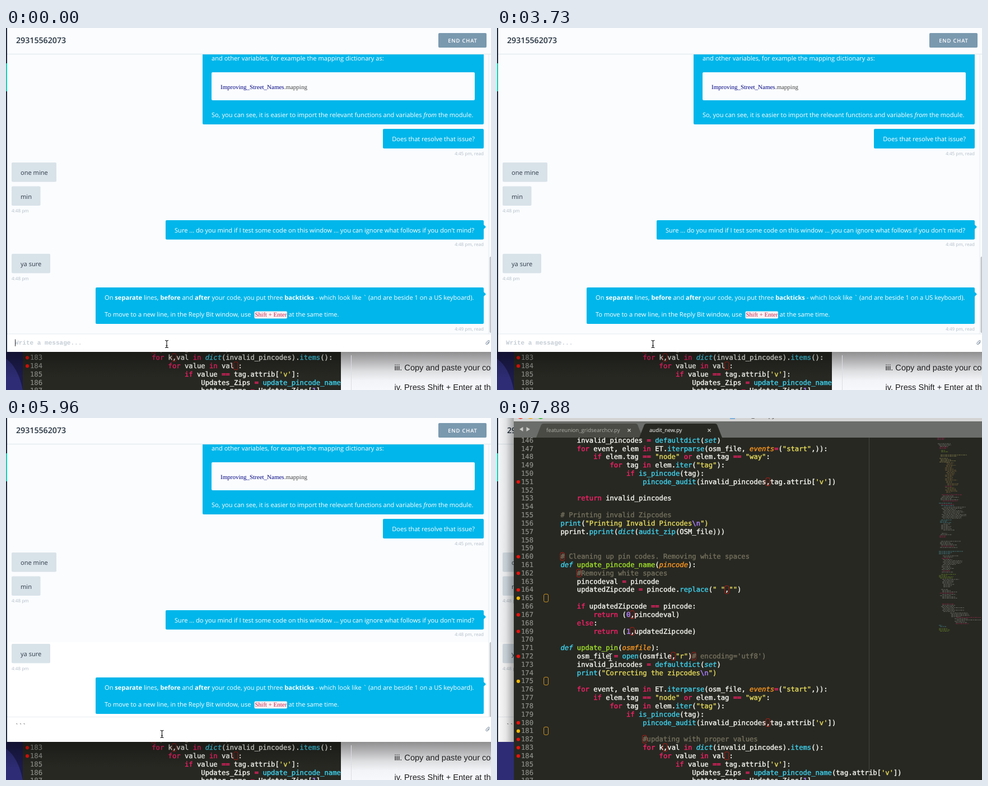
Animation of 866 by 646 pixels, one loop 8000 ms. Source, as an HTML page:

```html
<!DOCTYPE html>
<html lang="en">
<head>
<meta charset="utf-8">
<title>Chat and editor</title>
<style>
html, body { margin: 0; width: 100%; height: 100%; overflow: hidden; background: #fafcfe; }
svg { display: block; width: 866px; height: 646px; }
text { white-space: pre; text-rendering: geometricPrecision; font: 11.1px "Open Sans", sans-serif; fill: #2e3b48; }
.w { fill: #fff; }
.b { font-weight: 700; }
.i { font-style: italic; }
.id { font-size: 14.2px; font-weight: 600; fill: #25323f; }
.btn { font-size: 9.4px; font-weight: 600; letter-spacing: .85px; fill: #fff; }
.time { font-size: 8.1px; fill: #b3bec8; }
.serif { font: 11px "Liberation Serif", serif; }
.hint { font: bold 11.05px "Liberation Mono", monospace; fill: #c4cdd5; }
.typed { font: 11.05px "Liberation Mono", monospace; fill: #222; }
.page { font: 14.6px "Liberation Sans", sans-serif; fill: #1c1c1e; }
.code text { font: 12.19px "DejaVu Sans Mono", monospace; color: #f8f8f2; fill: currentColor; stroke: currentColor; stroke-width: .4px; }
.code .tab { font: 9.6px "Open Sans", sans-serif; color: #aeafa6; stroke: none; }
.code .on { color: #fff; }
.code .title { font-size: 11.5px; color: #444; }
.code .num { color: #8f908a; text-anchor: end; stroke-width: .2px; }
.code .com { color: #75715e; }
.code .str { color: #e6db5c; }
.code .esc, .code .lit { color: #ae81ff; }
.code .key { color: #f92069; }
.code .fn, .code .def, .code .type { color: #3ed2ee; }
.code .name { color: #a2e22a; }
.code .arg { color: #fd971f; }
.code .def, .code .type, .code .arg { font-style: italic; }
.end { text-anchor: end; }
.mid { text-anchor: middle; }
</style>
</head>
<body>
<svg id="stage" viewBox="0 0 866 646"></svg>
<script>
const esc = s => s.replace(/&/g, '&amp;').replace(/</g, '&lt;');
const text = (x, y, s, cls = '') => `<text x="${x}" y="${y}" class="${cls}">${esc(s)}</text>`;
const rect = (x, y, w, h, fill, rx = 0, more = '') =>
  `<rect x="${x}" y="${y}" width="${w}" height="${h}" fill="${fill}" rx="${rx}" ${more}/>`;
const path = (d, fill, more = '') => `<path d="${d}" fill="${fill}" ${more}/>`;
const fade = (id, axis, stops) =>
  `<linearGradient id="${id}" x1="0" y1="0" x2="${axis === 'x' ? 1 : 0}" y2="${axis === 'y' ? 1 : 0}">` +
  stops.map(([o, c, a = 1]) => `<stop offset="${o}" stop-color="${c}" stop-opacity="${a}"/>`).join('') +
  '</linearGradient>';

const BLUE = '#00b6ea', GREY = '#d8e2e9', BG = '#fafcfe', INK = '#272822';

const defs = `<defs>
  <clipPath id="strip"><rect x="30" y="578" width="568" height="68"/></clipPath>
  <clipPath id="full"><rect width="866" height="646"/></clipPath>
  <clipPath id="feed"><rect y="47" width="866" height="531"/></clipPath>
  <clipPath id="lines"><rect x="30" y="35" width="836" height="611"/></clipPath>` +
  fade('under', 'y', [[0, '#000', .34], [.5, '#000', .14], [1, '#000', 0]]) +
  fade('paper', 'y', [[0, '#8f8f90'], [.28, '#b9b9bb'], [.5, '#dcdddf'], [.75, '#f3f4f7'], [1, '#f7f8fb']]) +
  fade('side', 'x', [[0, '#000', .02], [.5, '#000', .1], [1, '#000', .34]]) +
  '</defs>';

// Desktop and the document behind the windows
const backdrop =
  rect(0, 578, 30, 68, '#2d2c74') +
  rect(598, 578, 268, 68, 'url(#paper)') +
  path('M616.5 584V646', 'none', 'stroke="#dcdde2" stroke-width="1"') +
  text(693.5, 611, 'iii. Copy and paste your code', 'page') +
  text(693.5, 646, 'iv. Press Shift + Enter at the', 'page');

// Chat window
const inBubble = (y, w, s) => rect(10, y, w, 34.5, GREY, 2) + text(26, y + 22, s);
const outBubble = (x, y, h, tail) => rect(x, y, 853 - x, h, BLUE, 2) +
  (tail ? path(`M852 ${y + 7}L857 ${y + 12}L852 ${y + 17}Z`, BLUE) : '');
const rich = (x, y, html) => `<text x="${x}" y="${y}" class="w">${html}</text>`;

const chat =
  rect(0, 0, 866, 578, BG) +
  '<rect id="pale" x="3" y="400" width="863" height="178" fill="#fff"/>' +
  rect(861.5, 47, 1, 500, '#e6ebef') +
  '<g clip-path="url(#feed)">' +
  outBubble(351, 40, 132) +
  text(367, 58, 'and other variables, for example the mapping dictionary as:', 'w') +
  rect(367, 79, 470, 50, BG, 2) +
  '<text x="383" y="108.5" class="serif" style="fill:#444"><tspan fill="#000080">Improving_Street_Names</tspan>.mapping</text>' +
  rich(367, 159, 'So, you can see, it is easier to import the relevant functions and variables <tspan class="i">from</tspan> the module.') +
  outBubble(673, 180, 35) +
  text(837, 202, 'Does that resolve that issue?', 'w end') +
  text(853, 227, '4:45 pm, read', 'time end') +
  inBubble(240, 80, 'one mine') +
  inBubble(282.5, 51.5, 'min') +
  text(10, 329, '4:48 pm', 'time') +
  outBubble(285, 343, 34.5, true) +
  text(301, 364.5, "Sure ... do you mind if I test some code on this window ... you can ignore what follows if you don't mind?", 'w') +
  text(853, 389, '4:48 pm, read', 'time end') +
  inBubble(403, 69, 'ya sure') +
  text(10, 449.5, '4:48 pm', 'time') +
  outBubble(160, 463, 65, true) +
  rich(176, 485, 'On <tspan class="b">separate</tspan> lines, <tspan class="b">before</tspan> and <tspan class="b">after</tspan> your code, you put three <tspan class="b">backticks</tspan> - which look like ` (and are beside 1 on a US keyboard).') +
  text(176, 515, 'To move to a new line, in the Reply Bit window, use', 'w') +
  rect(443.5, 505.5, 58.5, 13, '#f9f2f4', 2) +
  '<text x="444.5" y="515" class="serif" style="fill:#c7254e">Shift + Enter</text>' +
  text(504.5, 515, 'at the same time.', 'w') +
  text(853, 540, '4:49 pm, read', 'time end') +
  '</g>' +
  rect(0, 0, 866, 46, BG) + rect(2, 46, 864, 1.2, '#e2e8ed') +
  text(18, 27, '29315562073', 'id') +
  rect(772, 9, 86, 26, '#7a99af', 2) +
  text(815.5, 25.5, 'END CHAT', 'btn mid') +
  '<g id="thumb">' + rect(863.5, 408, 4, 136, '#c3c6c9', 2) + '</g>' +
  '<g id="box">' + rect(2, 546, 864, 46, '#fff') + rect(2, 545.5, 864, 1, '#e6ebef') + '</g>' +
  '<g id="clip" fill="none" stroke="#8a9aab" stroke-width="1"><path transform="rotate(45)" d="M1.8 -2V2.6A1.8 1.8 0 0 1 -1.8 2.6V-2.6A1.2 1.2 0 0 1 .6 -2.6V2"/></g>' +
  '<text id="hint" x="16" y="565" class="hint">Write a message...</text>' +
  '<text id="typed" x="16" class="typed"></text>' +
  '<rect id="caret" y="555.5" width="1" height="12.5" fill="#333"/>' +
  rect(0, 0, 2, 578, '#1f2b3d') + rect(0, 63, 2, 50, '#14d2b4');

// The chat window covers its own lower overflow, the desktop shows below it
const desktop = `<g id="desk">${backdrop}</g>`;

// Editor window
const CW = 7.34, X0 = 84.1, LH = 14.82, FIRST = 146;
const baseline = n => 43.7 + (n - FIRST) * LH;
const source = `        invalid_pincodes = defaultdict(set)
        for event, elem in ET.iterparse(osm_file, events=("start",)):
            if elem.tag == "node" or elem.tag == "way":
                for tag in elem.iter("tag"):
                    if is_pincode(tag):
                        pincode_audit(invalid_pincodes,tag.attrib['v'])

        return invalid_pincodes

    # Printing invalid Zipcodes
    print("Printing Invalid Pincodes\\n")
    pprint.pprint(dict(audit_zip(OSM_file)))


    # Cleaning up pin codes. Removing white spaces
    def update_pincode_name(pincode):
        #Removing white spaces
        pincodeval = pincode
        updatedZipcode = pincode.replace(" ","")

        if updatedZipcode == pincode:
            return (0,pincodeval)
        else:
            return (1,updatedZipcode)

    def update_pin(osmfile):
        osm_file = open(osmfile,"r")# encoding='utf8')
        invalid_pincodes = defaultdict(set)
        print("Correcting the zipcodes\\n")

        for event, elem in ET.iterparse(osm_file, events=("start",)):
            if elem.tag == "node" or elem.tag == "way":
                for tag in elem.iter("tag"):
                    if is_pincode(tag):
                        pincode_audit(invalid_pincodes,tag.attrib['v'])

                        #updating with proper values
                        for k,val in dict(invalid_pincodes).items():
                            for value in val :
                                if value == tag.attrib['v']:
                                    Updates_Zips = update_pincode_name(tag.attrib['v'])
                                    better_name = Updates_Zips[1]`.split('\n');

const rules = [
  ['com', '#.*'],
  ['esc', '\\\\n'],
  ['str', '"[^"\\\\]*"?|\'[^\']*\''],
  ['name', '(?<=def )\\w+'],
  ['arg', '(?<=def \\w+\\()\\w+|events(?==)'],
  ['def', '\\bdef\\b'],
  ['type', '\\b(?:dict|set)\\b'],
  ['key', '\\b(?:for|in|if|or|return|else)\\b|==?'],
  ['fn', '\\w+(?=\\()'],
  ['lit', '\\b\\d\\b'],
  ['plain', '\\w+|[^\\w\\s]']
];
const lexer = new RegExp(rules.map(([k, r]) => `(?<${k}>${r})`).join('|'), 'g');
const codeLine = (s, n) => [...s.matchAll(lexer)].map(m => {
  const kind = rules.find(([k]) => m.groups[k] !== undefined)[0];
  return text((X0 + m.index * CW).toFixed(2), baseline(n).toFixed(2), m[0], kind);
}).join('');

// Lint marks: line and the columns that are boxed
const errors = [[151, 54], [160, 4], [162, 8], [164, 44], [167, 21], [169, 21], [172, 31, 36],
  [180, 54], [182, 24], [183, 29], [184, 44]];
const warnings = [[165, 0], [175, 0], [181, 0]];
const marks = (list, dot, line, w) => list.map(([n, ...cols]) => {
  const y = baseline(n) - 4;
  return `<circle cx="38" cy="${y + .3}" r="3.1" fill="${dot}"/>` + cols.map(c =>
    rect(X0 + c * CW - .5, y - 7, w, 14, 'none', 2.5, `stroke="${line}" stroke-width=".9"`)).join('');
}).join('');

// Overview blocks: top, bottom, left, widest line, colour
const blocks = [
  [36, 39, 786, 16, '#f92672'], [46, 52, 787, 30, '#c8c8c0'], [52, 56, 786, 20, '#f92672'],
  [58, 61, 789, 18, '#a6e22e'], [66, 70, 790, 55, '#e6db74'], [72, 80, 790, 36, '#e6db74'],
  [80, 133, 800, 24, '#c8a050'], [137, 150, 792, 42, '#c8c8c0'], [152, 157, 789, 28, '#66d9ef'],
  [159, 180, 794, 50, '#c8c8c0'], [182, 187, 789, 30, '#66d9ef'], [189, 200, 793, 24, '#c8c8c0'],
  [206, 214, 790, 26, '#c8c8c0'], [220, 233, 791, 40, '#c8c8c0'], [238, 244, 789, 50, '#66d9ef'],
  [246, 263, 794, 42, '#c8c8c0'], [264, 275, 792, 24, '#c8c8c0'], [279, 286, 789, 30, '#a6e22e'],
  [288, 302, 793, 36, '#c8c8c0'], [306, 322, 791, 36, '#c8c8c0'], [332, 347, 793, 50, '#c8c8c0'],
  [348, 356, 807, 40, '#c8c8c0'], [356, 368, 817, 49, '#c8c8c0'], [370, 373, 789, 14, '#66d9ef'],
  [376, 382, 787, 22, '#a6e22e']];
let seed = 7;
const rnd = () => (seed = seed * 16807 % 2147483647) / 2147483647;
const overview = blocks.map(([top, bottom, left, wide, color]) => {
  let out = '';
  for (let y = top; y < bottom; y += 2.2) {
    const x = left + Math.floor(rnd() * 3) * 2;
    out += path(`M${x} ${y}h${wide * (.35 + rnd() * .55)}`, 'none',
      `stroke="${rnd() < .1 ? '#f92672' : color}" stroke-dasharray="4 1 2 1" stroke-width=".9" opacity=".45"`);
  }
  return out;
}).join('');

const dot = (x, c) => `<circle cx="${x}" cy="-3" r="5" fill="${c}"/>`;
const cross = x => path(`M${x - 2.5} 19.5l5 5m0 -5l-5 5`, 'none', 'stroke="#c9c9c4" stroke-width="1.2"');
const tabShape = (x, w, fill) =>
  path(`M${x} 35L${x + 9} 12Q${x + 10} 10 ${x + 13} 10H${x + w - 13}Q${x + w - 10} 10 ${x + w - 9} 12L${x + w} 35Z`, fill);
const editor =
  rect(30, 0, 836, 646, INK) +
  rect(30, 0, 836, 6, '#d4d4d4') + dot(42, '#f0524a') + dot(60, '#f5b52e') + dot(78, '#3fc441') +
  rect(416, 0, 9, 2, '#7fb2dc') +
  text(427, -1.2, 'audit_new.py', 'tab title') +
  rect(30, 6, 836, 29, '#6b6d6a') +
  path('M46.5 16V24L40 20ZM52.5 16V24L59 20Z', '#c9cac6') +
  tabShape(70, 190, '#4a4b45') + tabShape(254, 148, INK) +
  text(88, 25, 'featureunion_gridsearchcv.py', 'tab') + cross(236) +
  text(272, 25, 'audit_new.py', 'tab on') + cross(379) +
  '<g clip-path="url(#lines)">' +
  rect(664, 35, 1, 611, '#45463f') +
  marks(errors, '#e8120c', '#c81a14', 7.4) + marks(warnings, '#f2b705', '#e0a020', 8) +
  source.map((s, i) => text(65, baseline(FIRST + i).toFixed(2), String(FIRST + i), 'num') + codeLine(s, FIRST + i)).join('') +
  overview + '</g>';

const beam = 'M-3 -6.5Q0 -6.5 0 -4.8V4.8Q0 6.5 -3 6.5M3 -6.5Q0 -6.5 0 -4.8V4.8Q0 6.5 3 6.5M-1.5 2.5H1.5';

document.getElementById('stage').innerHTML = defs + chat +
  `<g id="sideShade">${rect(2, 0, 28, 646, 'url(#side)')}</g>` + desktop +
  `<g id="editor" class="code">${editor}</g>` +
  `<g id="underShade">${path('M0 578H30V646Q22 606 0 590Z', '#1c1b4b')}${rect(0, 578, 598, 46, 'url(#under)')}</g>` +
  `<path id="mouse" d="${beam}" fill="none" stroke-width="1.1"/>`;

// Timeline: [start ms, value]
const LOOP = 8000;
const NEWLINE = 5360, SWITCH = 7150;
const carets = [[0, 16], [300, null], [890, 16], [1490, null], [1940, 16], [2540, null], [3130, 16],
  [3730, null], [4020, 23], [4320, 30], [4620, 36], [4760, null], [NEWLINE, 16], [5960, null], [6550, 16],
  [SWITCH, null]];
const ticks = [[0, 0], [4020, 1], [4320, 2], [4620, 3]];
const mice = [[0, [287, 564]], [750, [283, 564]], [3130, [278.5, 564]], [6260, [274.5, 564]],
  [6400, [260, 640]], [6550, null], [7440, [310, 632]], [7590, [305.5, 527]], [7740, [247.5, 450]],
  [7880, [202.5, 427]]];

const at = (steps, t) => steps.findLast(([start]) => start <= t)[1];
const el = id => document.getElementById(id);
const show = (id, on) => el(id).setAttribute('visibility', on ? 'visible' : 'hidden');
const move = (id, x, y) => el(id).setAttribute('transform', `translate(${x} ${y})`);

function draw(t) {
  const caret = at(carets, t), typed = at(ticks, t), mouse = at(mice, t);
  const two = t >= NEWLINE, coding = t >= SWITCH;

  show('pale', two);
  move('box', 0, two ? -12.5 : 0);
  move('thumb', 0, two ? -8 : 0);
  move('clip', 860.5, two ? 555 : 561);
  show('hint', !typed);
  el('typed').textContent = '`'.repeat(typed);
  el('typed').setAttribute('y', two ? 552.5 : 565);
  show('caret', caret !== null);
  if (caret !== null) el('caret').setAttribute('x', caret);

  el('editor').setAttribute('clip-path', `url(#${coding ? 'full' : 'strip'})`);
  show('sideShade', coding);
  show('underShade', !coding);

  show('mouse', mouse);
  if (mouse) {
    move('mouse', ...mouse);
    el('mouse').setAttribute('stroke', mouse[1] > 578 || coding ? '#f4f4f0' : '#111');
  }
}

const begin = performance.now();
function tick() {
  draw((performance.now() - begin) % LOOP);
  requestAnimationFrame(tick);
}
draw(0);
requestAnimationFrame(tick);
</script>
</body>
</html>
```
